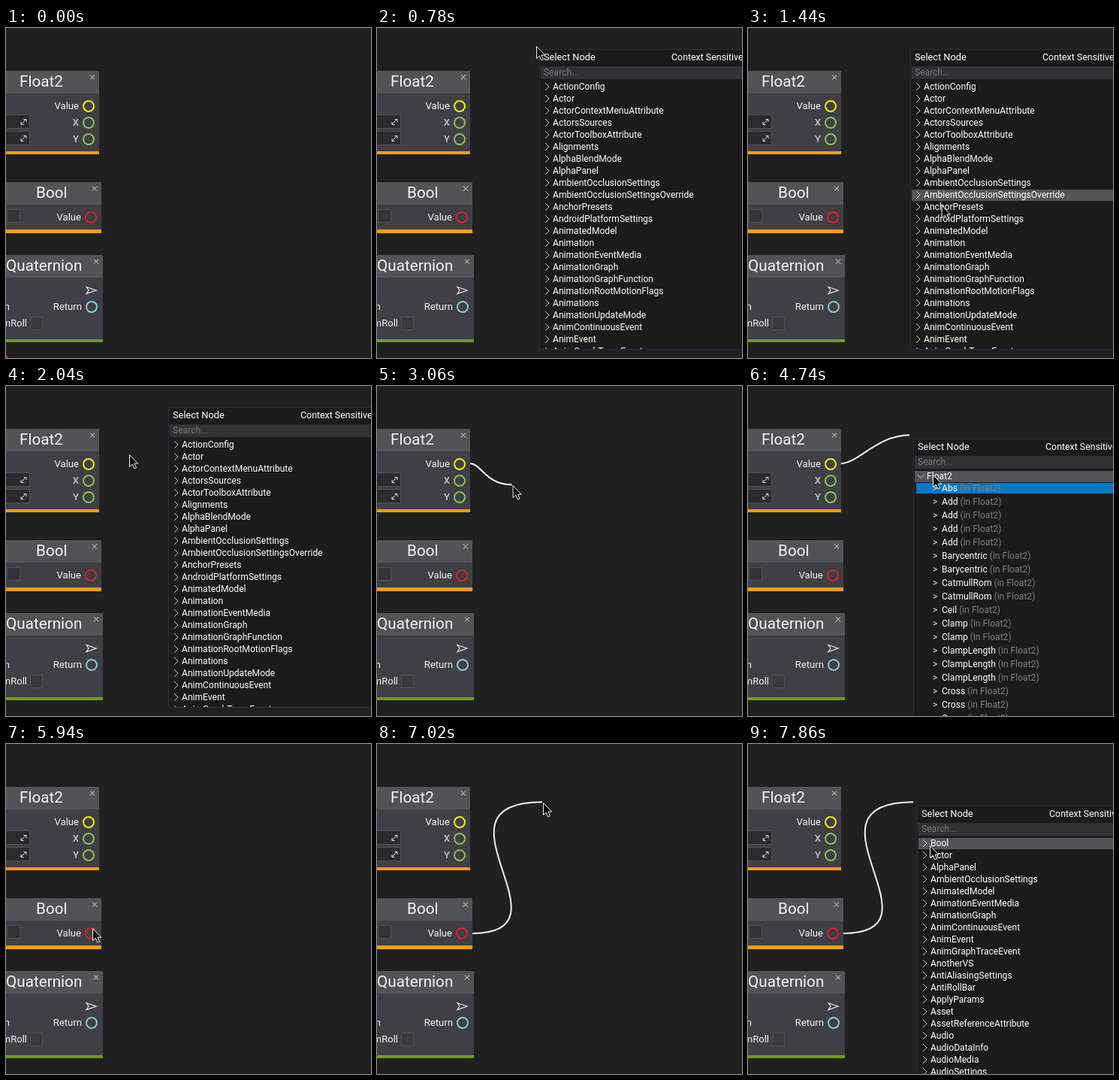
Recreate the animation shown at these times as an HTML page with a canvas. Size 486 by 439 pixels, loop 8000 ms.

```html
<!DOCTYPE html>
<html>
<head>
<meta charset="utf-8">
<style>
html, body { margin: 0; height: 100%; overflow: hidden; background: #202020; }
canvas { display: block; }
</style>
</head>
<body>
<canvas id="stage" width="486" height="439"></canvas>
<script>
const ctx = document.getElementById('stage').getContext('2d');
const LOOP = 8000, STEP = 60;

const allNodes = ('ActionConfig Actor ActorContextMenuAttribute ActorsSources ActorToolboxAttribute ' +
  'Alignments AlphaBlendMode AlphaPanel AmbientOcclusionSettings AmbientOcclusionSettingsOverride ' +
  'AnchorPresets AndroidPlatformSettings AnimatedModel Animation AnimationEventMedia AnimationGraph ' +
  'AnimationGraphFunction AnimationRootMotionFlags Animations AnimationUpdateMode ' +
  'AnimContinuousEvent AnimEvent AnimGraphTraceEvent').split(' ');
const matching = ('Actor AlphaPanel AmbientOcclusionSettings AnimatedModel AnimationEventMedia ' +
  'AnimationGraph AnimContinuousEvent AnimEvent AnimGraphTraceEvent AnotherVS AntiAliasingSettings ' +
  'AntiRollBar ApplyParams Asset AssetReferenceAttribute Audio AudioDataInfo AudioMedia ' +
  'AudioSettings AudioSource').split(' ');
const methods = ('Abs Add Add Add Add Barycentric Barycentric CatmullRom CatmullRom Ceil Clamp Clamp ' +
  'ClampLength ClampLength ClampLength Cross Cross Cross').split(' ');

// Menus open beside the cursor; wires follow it until the menu opens.
const menus = [
  { from: 780, to: 2100, items: allNodes },
  { from: 3780, to: 5460, items: ['Float2', ...matching], expandAt: 4740 },
  { from: 7260, to: LOOP, items: ['Bool', ...matching] },
];
const wires = [
  { from: 2760, drop: 3480, to: 5460, x: 124, y: 103 },
  { from: 6120, drop: 7020, to: LOOP, x: 127, y: 252 },
];
const entry = { at: 60, x: 300, y: 436 };
const moves = [
  { at: 660, take: 600, x: 212, y: 24 },    // open the full list
  { at: 1500, take: 600, x: 259, y: 242 },  // browse it
  { at: 2040, take: 360, x: 164, y: 91 },   // click away
  { at: 2520, take: 240, x: 109, y: 105 },  // drag from Float2
  { at: 2760, take: 60, x: 179, y: 135 },
  { at: 3480, take: 480, x: 216, y: 66 },
  { at: 4260, take: 360, x: 246, y: 118 },  // expand the first entry
  { at: 5700, take: 780, x: 158, y: 192 },
  { at: 5940, take: 180, x: 115, y: 245 },  // drag from Bool
  { at: 6240, take: 180, x: 168, y: 285 },
  { at: 7020, take: 480, x: 221, y: 78 },
  { at: 7860, take: 600, x: 242, y: 135 },
];

const smooth = k => k * k * (3 - 2 * k);

function cursorAt(t) {
  let { x, y } = entry;
  for (const move of moves) {
    const k = smooth(Math.min(1, Math.max(0, 1 - (move.at - t) / move.take)));
    x += (move.x - x) * k;
    y += (move.y - y) * k;
  }
  return { x, y };
}

function rect(x, y, w, h, color) {
  ctx.fillStyle = color;
  ctx.fillRect(x, y, w, h);
}

function text(str, x, y, color = '#fff', size = 12.1, align = 'left', weight = 400) {
  ctx.font = `${weight} ${size}px Roboto, sans-serif`;
  ctx.textAlign = align;
  ctx.fillStyle = color;
  ctx.fillText(str, x, y);
  return ctx.measureText(str).width;
}

function line(points, color, width = 1, closed = false) {
  ctx.beginPath();
  points.forEach(([x, y]) => ctx.lineTo(x, y));
  if (closed) ctx.closePath();
  ctx.strokeStyle = color;
  ctx.lineWidth = width;
  ctx.stroke();
}

function frame(x, y, w, h, fill) {
  rect(x, y, w, h, '#505056');
  rect(x + 1, y + 1, w - 2, h - 2, fill);
}

function node(title, titleX, top, right, bottom, bar, barHeight) {
  rect(0, top, right, bottom - top, '#3f3f45');
  rect(0, top, right, 30, '#525257');
  rect(0, bottom - barHeight, right, barHeight, bar);
  text(title, titleX, top + 21, '#f4f4f4', 20.7);
  const x = right - 9, y = top + 8.5;
  for (const d of [-3, 3]) line([[x - d, y - 3], [x + d, y + 3]], '#a0a0a4', 1.3);
}

function pin(label, x, y, color, labelColor = '#f4f4f4', weight = 400) {
  text(label, x - 13, y + 4, labelColor, 13.1, 'right', weight);
  ctx.beginPath();
  ctx.arc(x, y, 7, 0, Math.PI * 2);
  ctx.strokeStyle = color;
  ctx.lineWidth = 2;
  ctx.stroke();
}

function numberBox(y) {
  frame(-2, y, 34, 19, '#2b2b2f');
  const x = 23.5, c = y + 10;
  line([[x - 3.5, c + 3], [x + 3.5, c - 4]], '#ddd');
  for (const d of [-3.5, 3.5]) line([[x, c - d], [x - d, c - d], [x - d, c]].map(
    ([px, py]) => [2 * x - px, py]), '#ddd');
}

function drawNodes() {
  node('Float2', 18, 57, 124, 168, '#fb9d0c', 4);
  pin('Value', 110, 104, '#f2ec0c');
  ['X', 'Y'].forEach((axis, i) => {
    pin(axis, 110, 126 + i * 22, '#8bc152', '#c4c4c8', 500);
    numberBox(115 + i * 22);
  });

  node('Bool', 40, 205, 127, 273, '#fb9d0c', 5);
  pin('Value', 113, 252, '#dc2027');
  frame(1, 241, 18, 18, '#343438');

  node('Quaternion', 0, 302, 129, 418, '#6b9f1e', 4);
  line([[107, 344.5], [120, 349], [107, 353.5], [110, 349]], '#eee', 1.2, true);
  pin('Return', 114, 371, '#86c8dc');
  text('m', 5, 375, '#f4f4f4', 13, 'right');
  text('FromRoll', 28, 397, '#f4f4f4', 13, 'right');
  frame(32, 384, 17, 18, '#39393e');
}

function drawWire(wire, t) {
  const { x, y, drop } = wire;
  const end = cursorAt(Math.min(t, drop));
  const ex = end.x - 1, ey = end.y - .7;
  const reach = Math.abs(ey - y) * .86;   // taller spans bow further out
  ctx.beginPath();
  ctx.moveTo(x, y);
  ctx.bezierCurveTo(x + Math.max(0, reach - 10), y, ex - reach - 10, ey, ex, ey);
  ctx.strokeStyle = '#f4f4f4';
  ctx.lineWidth = 2;
  ctx.stroke();
}

function drawMethods(x, y) {
  rect(x + 3, y + 59, 486, 14, '#0579c8');
  methods.forEach((name, i) => {
    const base = y + 70 + i * 18;
    text('>', x + 25, base, '#e4e4e4', 12);
    const width = text(name + ' ', x + 37, base);
    text('(in Float2)', x + 37 + width, base, '#808084');
  });
}

function drawMenu(menu, t) {
  const opener = cursorAt(menu.from);
  const x = Math.round(opener.x) + 5, y = Math.round(opener.y) + 4;
  const width = 500, height = 400;
  const expanded = t >= menu.expandAt;
  const items = expanded ? menu.items.slice(0, 1) : menu.items;
  const hover = cursorAt(t - STEP);   // highlight trails the cursor by one step
  const row = hover.x > x ? Math.floor((hover.y - y - 42) / 16) : -1;
  ctx.save();
  rect(x - 1, y, width, height, '#18344a');
  rect(x, y + 1, width, height - 2, '#1b1b1c');
  text('Select Node', x + 5, y + 15, '#fff', 12.8);
  text('Context Sensitive', x + 175, y + 15, '#fff', 12.4);
  rect(x + 1, y + 23, width, 17, '#323236');
  text('Search...', x + 5, y + 35, '#77777b');
  ctx.beginPath();
  ctx.rect(x, y + 40, width, height - 41);
  ctx.clip();
  items.forEach((name, i) => {
    const c = y + 50 + i * 16;
    if (i === row) rect(x + 1, c - 7, width, 15, '#545459');
    line(expanded ? [[x + 4, c - 2.5], [x + 9, c + 2.5], [x + 14, c - 2.5]]
      : [[x + 7, c - 5], [x + 12, c], [x + 7, c + 5]], '#c8c8c8');
    text(name, x + 17, c + 4);
  });
  if (expanded) drawMethods(x, y);
  ctx.restore();
}

const arrow = new Path2D('M0 0V16L3.7 12.6L6.4 18.4L9 17.2L6.4 11.6H11.2Z');

function drawCursor({ x, y }) {
  ctx.save();
  ctx.translate(x + .5, y + .5);
  ctx.fillStyle = '#0c0c0c';
  ctx.fill(arrow);
  ctx.strokeStyle = '#f0f0f0';
  ctx.lineWidth = 1;
  ctx.stroke(arrow);
  ctx.restore();
}

function draw(now) {
  const t = Math.floor(now % LOOP / STEP) * STEP;
  const active = item => t >= item.from && t < item.to;
  rect(0, 0, 486, 439, '#202020');
  rect(0, 437, 486, 2, '#231c20');
  if (t < entry.at) rect(0, 436, 3, 3, '#a0109a');
  drawNodes();
  wires.filter(active).forEach(wire => drawWire(wire, t));
  menus.filter(active).forEach(menu => drawMenu(menu, t));
  if (t >= entry.at) drawCursor(cursorAt(t));
}

const start = performance.now();
function tick() {
  draw(performance.now() - start);
  requestAnimationFrame(tick);
}
tick();
</script>
</body>
</html>
```
